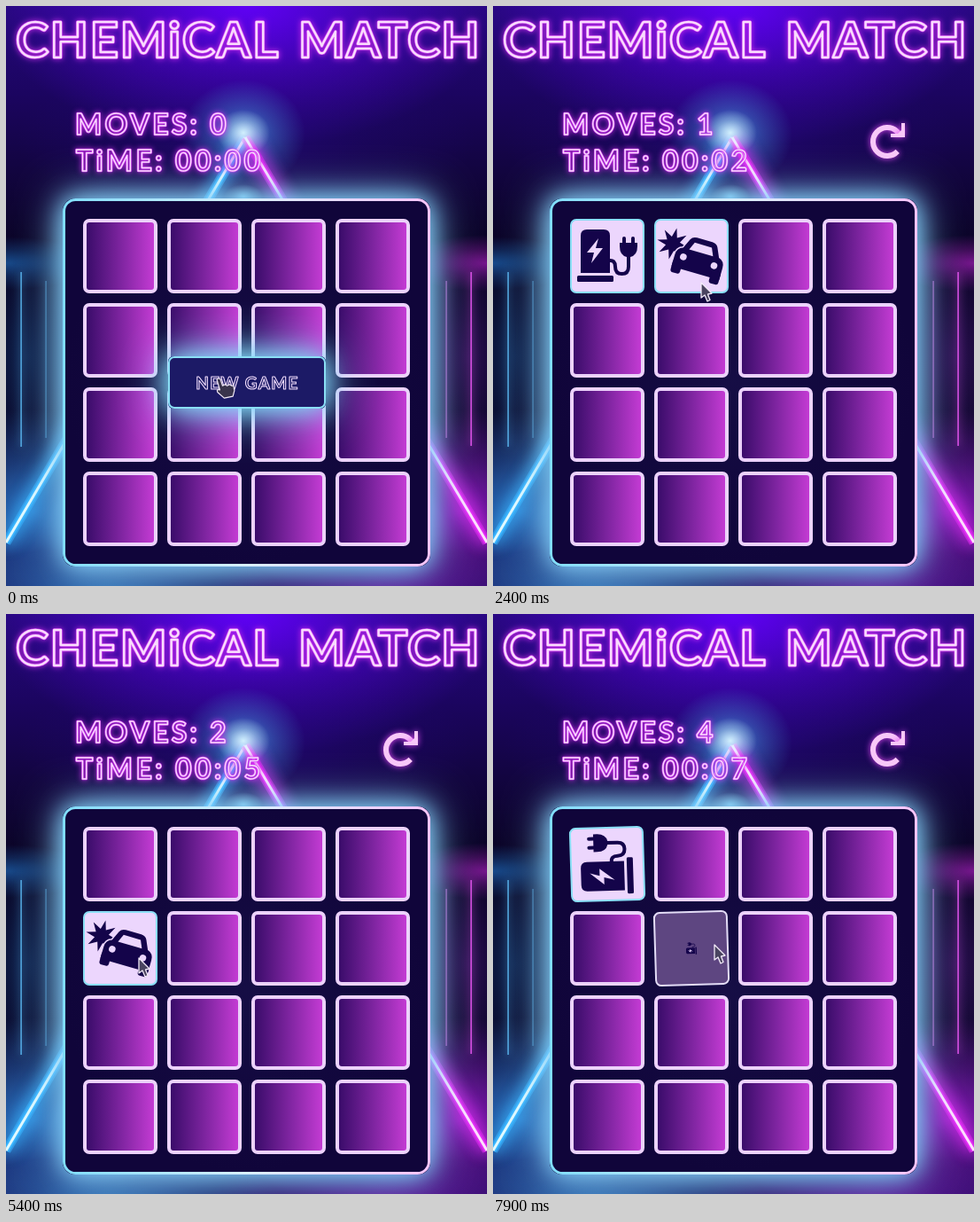
Animation of 543 by 654 pixels, one loop 8 s. Source, as an HTML page with a canvas:

```html
<!DOCTYPE html>
<html lang="en">
<head>
<meta charset="utf-8">
<title>Chemical Match</title>
<style>
html, body { margin: 0; width: 543px; height: 654px; overflow: hidden; background: #0b0428 }
canvas { display: block }
</style>
</head>
<body>
<canvas id="stage" width="543" height="654"></canvas>
<script>
const W = 543, H = 654, LOOP = 8000, STEP = 100;
const INK = '#14044a', PALE = '#ecd6fd', CYAN = '#8adff5';
const view = document.getElementById('stage').getContext('2d');
const back = document.createElement('canvas');
back.width = W; back.height = H;
let c = back.getContext('2d');

// ---- helpers ----
function box(x, y, w, h, r, fill, line, lw) {
  c.beginPath();
  c.roundRect(x, y, w, h, r);
  if (fill) { c.fillStyle = fill; c.fill(); }
  if (line) { c.strokeStyle = line; c.lineWidth = lw; c.stroke(); }
}
function poly(pts, fill) {
  c.beginPath();
  for (let i = 0; i < pts.length; i += 2) c.lineTo(pts[i], pts[i + 1]);
  c.closePath();
  c.fillStyle = fill;
  c.fill();
}
function disc(x, y, r, fill) {
  c.beginPath();
  c.arc(x, y, r, 0, 7);
  c.fillStyle = fill;
  c.fill();
}
function path(d, fill, line, lw) {
  const p = new Path2D(d);
  if (fill) { c.fillStyle = fill; c.fill(p); }
  if (line) { c.strokeStyle = line; c.lineWidth = lw; c.stroke(p); }
}
function ramp(x0, y0, x1, y1, ...colors) {
  const g = c.createLinearGradient(x0, y0, x1, y1);
  colors.forEach((col, i) => g.addColorStop(i / (colors.length - 1), col));
  return g;
}
function glow(x, y, rx, ry, color, strength = 1) {
  c.save();
  c.globalAlpha = strength;
  c.translate(x, y);
  c.scale(rx, ry);
  const g = c.createRadialGradient(0, 0, 0, 0, 0, 1);
  g.addColorStop(0, color);
  g.addColorStop(0.5, color + '70');
  g.addColorStop(1, color + '00');
  c.fillStyle = g;
  c.fillRect(-1, -1, 2, 2);
  c.restore();
}
function halo(color, blur, draw) {
  c.save();
  c.shadowColor = color;
  c.shadowBlur = blur;
  draw();
  c.restore();
}
function tube(x0, y0, x1, y1, color, core, w) {
  const line = (col, lw) => {
    c.strokeStyle = col;
    c.lineWidth = lw;
    c.beginPath();
    c.moveTo(x0, y0);
    c.lineTo(x1, y1);
    c.stroke();
  };
  halo(color, 18, () => { line(color + '90', w * 2.2); line(color, w * 1.4); });
  line(core, w * 0.6);
}
function neon(text, x, y, size, gap, lw) {
  c.font = `700 ${size}px Lato, sans-serif`;
  c.letterSpacing = gap + 'px';
  c.lineJoin = 'round';
  halo('#d32cf0', 6, () => {
    c.strokeStyle = '#cf4af0';
    c.lineWidth = lw + 1.2;
    c.strokeText(text, x, y);
  });
  c.strokeStyle = '#f9dcfd';
  c.lineWidth = lw;
  c.strokeText(text, x, y);
}

// ---- still scenery ----
function scenery() {
  c.fillStyle = ramp(0, 0, 0, H, '#26087c', '#1c0562', '#12053f', '#080322', '#080426', '#0a0628', '#100a44', '#140a50');
  c.fillRect(0, 0, W, H);
  glow(271, -5, 290, 165, '#6400ff', 0.95);
  glow(271, 150, 260, 90, '#2a0890', 0.5);

  // side walls and floor
  glow(0, 290, 100, 30, '#1c62b0', 0.75);
  glow(543, 290, 100, 32, '#a01cb4', 0.75);
  glow(25, 395, 70, 130, '#123a6c', 0.55);
  glow(520, 395, 70, 130, '#40146a', 0.6);
  glow(30, 570, 150, 115, '#2f86d8', 0.85);
  glow(513, 570, 150, 115, '#9a1cc8', 0.85);
  glow(120, 660, 190, 50, '#3a9ce0', 0.7);
  glow(420, 660, 190, 50, '#7c1cb8', 0.7);
  for (const [x, y0, y1, col, a] of [[17, 300, 497, '#58b4ee', 0.8], [45, 310, 487, '#58b4ee', 0.4],
    [497, 310, 487, '#e070e8', 0.5], [525, 300, 496, '#e050ea', 0.85]]) {
    c.globalAlpha = a;
    halo(col, 8, () => box(x - 0.8, y0, 1.8, y1 - y0, 0, col));
  }
  c.globalAlpha = 1;

  // big triangle
  glow(268, 145, 70, 62, '#4ab0f0', 0.75);
  tube(270, 148, 0, 605, '#38b4ff', '#e2faff', 5);
  tube(270, 148, 543, 605, '#e22cf4', '#ffe0ff', 5);
  glow(268, 143, 30, 26, '#d8f6ff', 0.95);
  glow(268, 215, 22, 14, '#9ae4ff', 0.8);

  // board
  for (const blur of [50, 26]) halo('#84d0fa', blur, () => box(64, 217, 415, 415, 14, '#10053a'));
  box(65.5, 218.5, 412, 412, 13, '#10053a');
  glow(271, 424, 205, 205, '#1c1650', 0.5);
  box(65.5, 218.5, 412, 412, 13, null, ramp(64, 0, 479, 0, '#7fdcfb', '#d8f0ff', '#f6c4fa'), 3);
  neon('CHEMiCAL', 11, 58, 56, 1.8, 2.5);
  neon('MATCH', 330, 58, 56, 1, 2.5);
}

// ---- card pictures, drawn on an 84 px square ----
function charger() {
  path('M12 61V19Q12 12 19 12H38Q45 12 45 19V61Z', INK);
  box(8, 64, 41, 7, 1.5, INK);
  poly([32, 22, 19, 38, 27, 38, 24, 50, 37, 33, 29, 33], PALE);
  path('M44 47Q51 46 51 54Q51 62 58.500 62Q66 62 66 54V42', null, INK, 4);
  path('M56 27H76V31Q76 41 68 43H64Q56 41 56 31Z', INK);
  box(59, 20, 4, 9, 2, INK);
  box(69, 20, 4, 9, 2, INK);
}
function spaceman() {
  disc(42, 31, 19, INK);
  box(21, 24, 5, 15, 2, INK);
  box(58, 24, 5, 15, 2, INK);
  box(27, 22, 30, 20, 9, PALE);
  poly([36, 24, 38, 29, 43, 31, 38, 33, 36, 38, 34, 33, 29, 31, 34, 29], INK);
  path('M15 71Q15 50 33 49Q42 54 51 49Q69 50 69 71Z', INK);
  box(31, 60, 21, 12, 3, PALE);
  box(34, 63, 15, 9, 2, INK);
  box(42, 63, 3, 5, 0, PALE);
}
function patient() {
  disc(42, 28, 16, INK);
  path('M26 25H58M34 25L58 12', null, PALE, 3);
  path('M15 71Q14 51 33 48H51Q69 51 68 71Z', INK);
  path('M30 48L57 71M28 53V71M27 61L39 71', null, PALE, 3);
  path('M31 59L45 70H31Z', INK);
}
function crash() {
  const star = [];
  for (let i = 0; i < 16; i++) {
    const r = i % 2 ? 8 : 18, a = i * Math.PI / 8 + 0.25;
    star.push(21 + r * Math.cos(a), 28 + r * Math.sin(a));
  }
  poly(star, INK);
  c.save();
  c.translate(51, 45);
  c.rotate(0.28);
  const shell = 'M-28 3Q-28 -5 -21 -7L-16 -18Q-14 -22 -9 -22H9Q14 -22 16 -18L21 -7Q28 -5 28 3V17H-28Z';
  path(shell, INK, PALE, 3);
  path(shell, INK);
  box(-28, 8, 11, 15, 3, INK);
  box(17, 8, 11, 15, 3, INK);
  path('M-14 -7L-10 -16H10L14 -7Z', PALE);
  disc(-18, 3, 3.8, PALE);
  disc(18, 3, 3.8, PALE);
  c.restore();
}

// ---- the game ----
const pictures = [charger, charger, spaceman, patient, crash, charger];
pictures[1] = crash;
// card, opened, closed
const turns = [[0, 900, 3000], [1, 2100, 3000], [2, 3300, 5000], [3, 4000, 5000],
  [4, 5200, 7000], [5, 6100, 7000], [0, 7200, LOOP], [5, 7810, LOOP]];
const moveTimes = [2200, 4000, 6200, 7800];
const MATCH_AT = 7810;
// time, x, y of the pointer
const route = [[0, 240, 421], [200, 240, 421], [800, 150, 302], [1100, 152, 302], [1700, 226, 313],
  [1900, 235, 312], [2999, 235, 312], [3000, 310, 319], [3300, 310, 319], [3600, 398, 299],
  [4100, 402, 299], [4200, 398, 300], [4400, 338, 312], [4900, 120, 385], [5000, 130, 390],
  [5200, 135, 390], [5400, 150, 388], [5800, 235, 402], [6000, 235, 402], [6500, 249, 407],
  [6700, 245, 400], [7100, 130, 300], [7300, 130, 300], [7900, 250, 373], [LOOP, 250, 373]];

const cardX = i => 87 + i % 4 * 95;
const cardY = i => 240 + Math.floor(i / 4) * 95;
const turnOf = (i, t) => turns.find(([n, from, to]) => n === i && t >= from && t < to);

function pointerAt(t) {
  const k = route.findIndex(p => p[0] > t);
  const [t0, x0, y0] = route[k - 1], [t1, x1, y1] = route[k];
  const p = (t - t0) / (t1 - t0);
  return [x0 + (x1 - x0) * p, y0 + (y1 - y0) * p];
}

function card(i, t) {
  const turn = turnOf(i, t);
  c.save();
  c.translate(cardX(i), cardY(i));
  if (!turn) {
    box(2, 2, 80, 80, 5, ramp(4, 0, 80, 0, '#3a0c6a', '#7d249f', '#c33bd3'), '#ecd2fb', 4);
  } else {
    const p = Math.min(1, (t - turn[1]) / 200), grown = p * p;
    if (t > MATCH_AT) {
      c.translate(42, 42);
      c.rotate(-(t - MATCH_AT) * 1.02 * Math.PI / 180);
      c.translate(-42, -42);
    }
    box(1, 1, 82, 82, 6, '#3a2160');
    c.globalAlpha = grown;
    box(1, 1, 82, 82, 6, PALE);
    c.globalAlpha = 1;
    box(1, 1, 82, 82, 6, null, p < 1 ? '#e3dcf6' : CYAN, 2);
    c.translate(42, 42);
    c.scale(grown, grown);
    c.translate(-42, -42);
    pictures[i]();
  }
  c.restore();
}

function button(alpha) {
  c.globalAlpha = alpha;
  for (const blur of [55, 28]) halo('#84dcfa', blur, () => box(183, 395, 178, 59, 6, '#1c1a66'));
  box(184, 396, 176, 57, 6, '#1c1a66', CYAN, 2);
  c.font = '700 19px Lato, sans-serif';
  c.letterSpacing = '1.3px';
  c.textAlign = 'center';
  c.strokeStyle = '#f0dcfc';
  c.lineWidth = 1.1;
  c.strokeText('NEW GAME', 272.5, 432);
  c.textAlign = 'left';
  c.globalAlpha = 1;
}

function reload() {
  halo('#e04af4', 7, () => {
    c.strokeStyle = '#f8c8f8';
    c.lineWidth = 6;
    c.beginPath();
    c.arc(445, 153, 16, 0.75, 5.7);
    c.stroke();
    poly([465, 132, 465, 148, 449, 148, 449, 144, 457, 144, 461, 140, 461, 132], '#f8c8f8');
  });
}

function pointer(t) {
  const [x, y] = pointerAt(t);
  let hand = t < 300;
  for (let i = 0; i < 16; i++) {
    const dx = x - cardX(i), dy = y - cardY(i);
    if (dx >= 0 && dx <= 84 && dy >= 0 && dy <= 84 && !turnOf(i, t)) hand = true;
  }
  c.save();
  c.translate(x, y);
  c.lineJoin = 'round';
  if (hand) {
    c.rotate(-0.2);
    path('M-2 0Q0 -2 2 0L3 8L6 7L8 9L11 8L13 10L15 10V16L12 22H2L-4 14Q-5 10 -1 12Z', '#39344c', '#f2eaf8', 1.2);
  } else {
    path('M0 0V17L4 14L7 21L10 19.500L7.500 13L12 12Z', '#4a4460', '#f2eaf8', 1.3);
  }
  c.restore();
}

function draw(t) {
  c = view;
  c.drawImage(back, 0, 0);
  const moves = moveTimes.filter(m => t >= m).length;
  const seconds = Math.max(0, Math.floor((t - 300) / 1000));
  neon('MOVES: ' + moves, 78, 145, 32, 3.2, 1.4);
  neon('TiME: 00:' + String(seconds).padStart(2, '0'), 79, 186, 32, 3.4, 1.4);
  for (let i = 0; i < 16; i++) if (!turnOf(i, t)) card(i, t);
  for (let i = 0; i < 16; i++) if (turnOf(i, t)) card(i, t);
  if (t < 500) button(1 - Math.max(0, t - 100) / 400 * (t >= 200));
  if (t >= 300) reload();
  pointer(t);
}

scenery();
const start = performance.now();
function tick() {
  const t = (performance.now() - start) % LOOP;
  draw(Math.floor(t / STEP) * STEP);
  requestAnimationFrame(tick);
}
tick();
</script>
</body>
</html>
```
